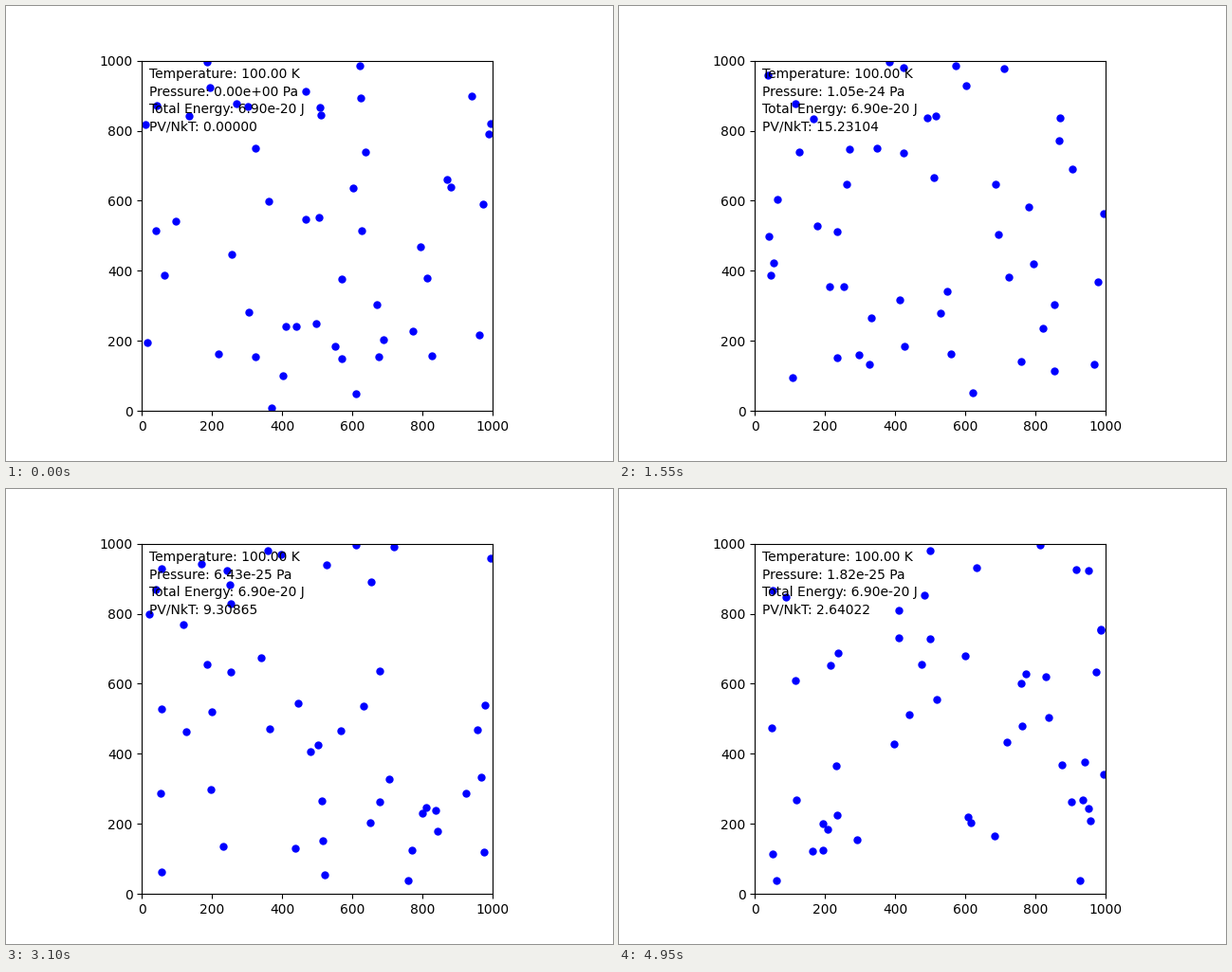
Recreate the animation shown at these times as a matplotlib script. Size 640x480 px, loop 5 s.

```python
import numpy as np
import matplotlib.pyplot as plt
from matplotlib.animation import FuncAnimation

SIZE = 1000        # box side
RADIUS = 5
WALL = SIZE - RADIUS
COUNT = 50
SPEED = 19         # spread of each velocity component, per frame
FRAMES = 100
SUBSTEPS = 4
N_KT = COUNT * 1.380649e-23 * 100

# Two particles glide along the top and the right wall
GLIDE_FRAMES = [0, 12, 31, 47, 62, 77, 99]
TOP_X = [187, 415, 383, 374, 610, 751, 815]
RIGHT_Y = [820, 419, 563, 597, 958, 526, 342]

# First frame of each reading and its PV/NkT
READINGS = [(0, 0), (1, 19.71402), (22, 15.23104), (39, 15.57993),
            (55, 9.30865), (88, 2.64022)]


def bounce_walls(pos, vel):
    under, over = pos < RADIUS, pos > WALL
    pos[under] = 2 * RADIUS - pos[under]
    pos[over] = 2 * WALL - pos[over]
    vel[under | over] *= -1


def bounce_pairs(pos, vel):
    gap = pos[:, None] - pos[None]
    near = np.triu((gap ** 2).sum(axis=2) < (2 * RADIUS) ** 2, 1)
    for i, j in zip(*np.nonzero(near)):
        normal = gap[i, j] / np.hypot(*gap[i, j])
        speed = (vel[i] - vel[j]) @ normal
        if speed < 0:
            vel[i] -= speed * normal
            vel[j] += speed * normal


def gliders(frame):
    return [(np.interp(frame, GLIDE_FRAMES, TOP_X), WALL),
            (WALL, np.interp(frame, GLIDE_FRAMES, RIGHT_Y))]


def simulate():
    rng = np.random.default_rng(7)
    free = COUNT - 2
    pos = rng.uniform(RADIUS, WALL, (free, 2))
    vel = rng.normal(0, SPEED, (free, 2))
    path = []
    for frame in range(FRAMES):
        path.append(np.vstack([pos, gliders(frame)]))
        for _ in range(SUBSTEPS):
            pos += vel / SUBSTEPS
            bounce_walls(pos, vel)
            bounce_pairs(pos, vel)
    return path


def reading(frame):
    return [value for first, value in READINGS if first <= frame][-1]


path = simulate()

fig, ax = plt.subplots(figsize=(6.4, 4.8), dpi=100)
ax.set_xlim(0, SIZE)
ax.set_ylim(0, SIZE)
ax.set_aspect("equal")
dots, = ax.plot([], [], "bo", markersize=5)
labels = [ax.text(0.02, y, "", transform=ax.transAxes)
          for y in (0.95, 0.90, 0.85, 0.80)]


def update(frame):
    dots.set_data(path[frame][:, 0], path[frame][:, 1])
    ratio = reading(frame)
    lines = ("Temperature: 100.00 K",
             f"Pressure: {ratio * N_KT / SIZE ** 2:.2e} Pa",
             f"Total Energy: {N_KT:.2e} J",
             f"PV/NkT: {ratio:.5f}")
    for label, line in zip(labels, lines):
        label.set_text(line)
    return [dots, *labels]


anim = FuncAnimation(fig, update, frames=FRAMES, interval=50,
                     repeat=True, repeat_delay=0)
plt.show()
```
